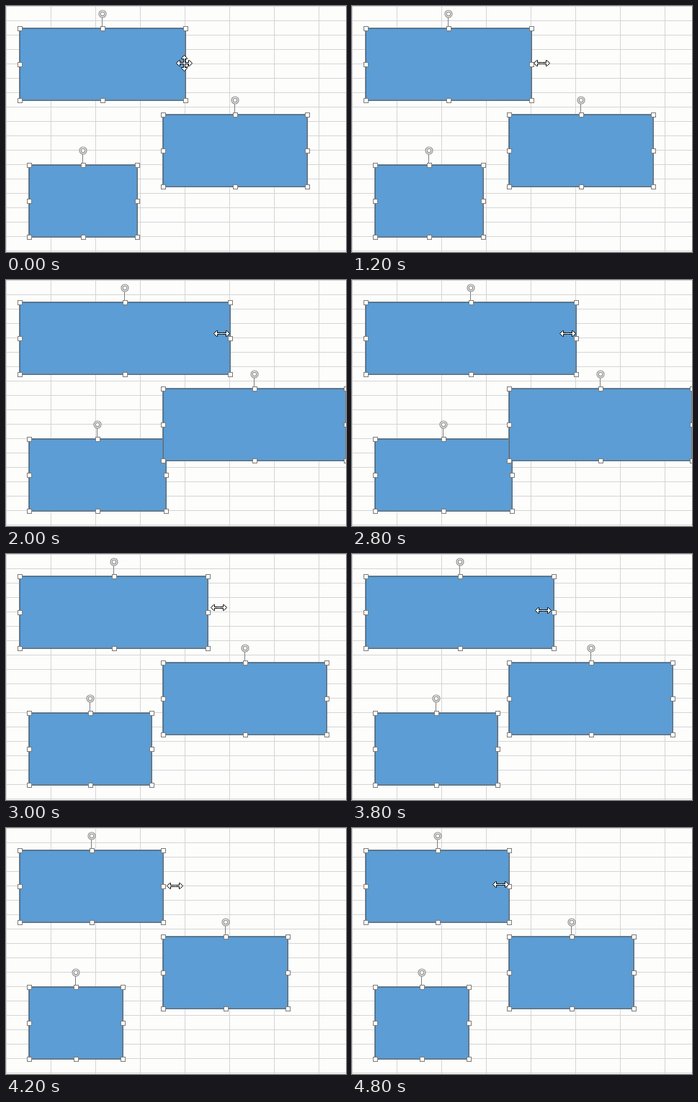
Write an HTML page with a canvas that moves like this. It is 472 px wide and 342 px high and loops after 5000 ms.

```html
<!DOCTYPE html>
<html lang="en">
<head>
<meta charset="utf-8">
<title>Resizing three shapes</title>
<style>
  html, body { margin: 0; width: 100%; height: 100%; overflow: hidden; background: #fdfdfc; }
  canvas { display: block; }
</style>
</head>
<body>
<canvas id="stage" width="472" height="342"></canvas>
<script>
const ctx = document.getElementById('stage').getContext('2d');
const WIDTH = 472, HEIGHT = 342, LOOP = 5000, STEP = 200;
const COLUMN = 62, ROW = 20;
const SHAPE_HEIGHT = 100, GROWTH = 31 / 230;

// Listed back to front
const shapes = [
  { x: 32, y: 221, width: 150 },
  { x: 218, y: 151, width: 200 },
  { x: 19, y: 31, width: 230 }
];

// Steps at which the dragged edges snap outwards or inwards
const growSteps = [7, 10], shrinkSteps = [15, 20, 21];

// The pointer moves in straight lines between these points
const path = [
  { step: 2, x: 247, y: 79 },
  { step: 4, x: 249, y: 79 },
  { step: 6, x: 263, y: 79 },
  { step: 10, x: 299, y: 74 },
  { step: 14, x: 299, y: 74 },
  { step: 18, x: 283, y: 75 },
  { step: 20, x: 247, y: 80 },
  { step: 23, x: 208, y: 80 },
  { step: 24, x: 206, y: 78 }
];

function sizeAt(step) {
  const passed = steps => steps.filter(s => s <= step).length;
  return passed(growSteps) - passed(shrinkSteps);
}

function pointerAt(step) {
  const next = Math.max(1, path.findIndex(point => point.step >= step));
  const a = path[next - 1], b = path[next];
  const t = Math.max(0, (step - a.step) / (b.step - a.step));
  const mix = key => Math.round(a[key] + (b[key] - a[key]) * t);
  return { x: mix('x'), y: mix('y') };
}

function rect(color, x, y, w, h) {
  ctx.fillStyle = color;
  ctx.fillRect(x, y, w, h);
}

function frame(color, x, y, w, h) {
  ctx.strokeStyle = color;
  ctx.lineWidth = 1;
  ctx.strokeRect(x + 0.5, y + 0.5, w, h);
}

function drawGrid() {
  rect('#fdfdfc', 0, 0, WIDTH, HEIGHT);
  for (let x = 0; x < WIDTH; x += COLUMN) rect('#d5d5d5', x, 0, 1, HEIGHT);
  for (let y = 0; y < HEIGHT; y += ROW) rect('#d5d5d5', 0, y, WIDTH, 1);
}

function drawHandle(x, y) {
  rect('#fff', x - 3, y - 3, 7, 7);
  frame('#7c7c7c', x - 3, y - 3, 6, 6);
}

function drawRotationKnob(x, y) {
  rect('#7f7f7f', x - 1, y + 5, 1, 13);
  ctx.fillStyle = '#fff';
  ctx.strokeStyle = '#858585';
  ctx.lineWidth = 1.1;
  for (const radius of [5, 2.8]) {
    ctx.beginPath();
    ctx.arc(x, y, radius, 0, Math.PI * 2);
    ctx.fill();
    ctx.stroke();
  }
}

function drawShape({ x, y, width }, size) {
  const w = Math.round(width * (1 + size * GROWTH)), h = SHAPE_HEIGHT;
  const middle = x + Math.round(w / 2), centre = y + h / 2;

  rect('#5b9dd4', x, y, w, h);
  frame('#41719c', x, y, w, h);
  frame('#7f7f7f', x - 1, y - 1, w, h);
  drawRotationKnob(middle, y - 20);

  for (const hx of [x, middle, x + w])
    for (const hy of [y, centre, y + h])
      if (hx !== middle || hy !== centre) drawHandle(hx, hy);
}

// Arrows pointing outwards from a common centre
function drawPointer({ x, y }, arms) {
  const arm = [[1, -1], [6, -1], [6, -4], [7, -4], [11, 0], [7, 4], [6, 4], [6, 1], [1, 1]];
  ctx.save();
  ctx.translate(x + 0.5, y + 0.5);
  ctx.beginPath();
  for (let i = 0; i < arms; i++) {
    const angle = i * Math.PI * 2 / arms;
    const c = Math.round(Math.cos(angle)), s = Math.round(Math.sin(angle));
    for (const [px, py] of arm) ctx.lineTo(px * c - py * s, px * s + py * c);
  }
  ctx.closePath();
  ctx.fillStyle = '#fff';
  ctx.strokeStyle = '#000';
  ctx.lineWidth = 1;
  ctx.lineJoin = 'round';
  ctx.fill();
  ctx.stroke();
  ctx.restore();
}

function draw() {
  const step = Math.floor(performance.now() % LOOP / STEP);
  drawGrid();
  shapes.forEach(shape => drawShape(shape, sizeAt(step)));
  drawPointer(pointerAt(step), step === 0 ? 4 : 2);
  requestAnimationFrame(draw);
}
draw();
</script>
</body>
</html>
```
